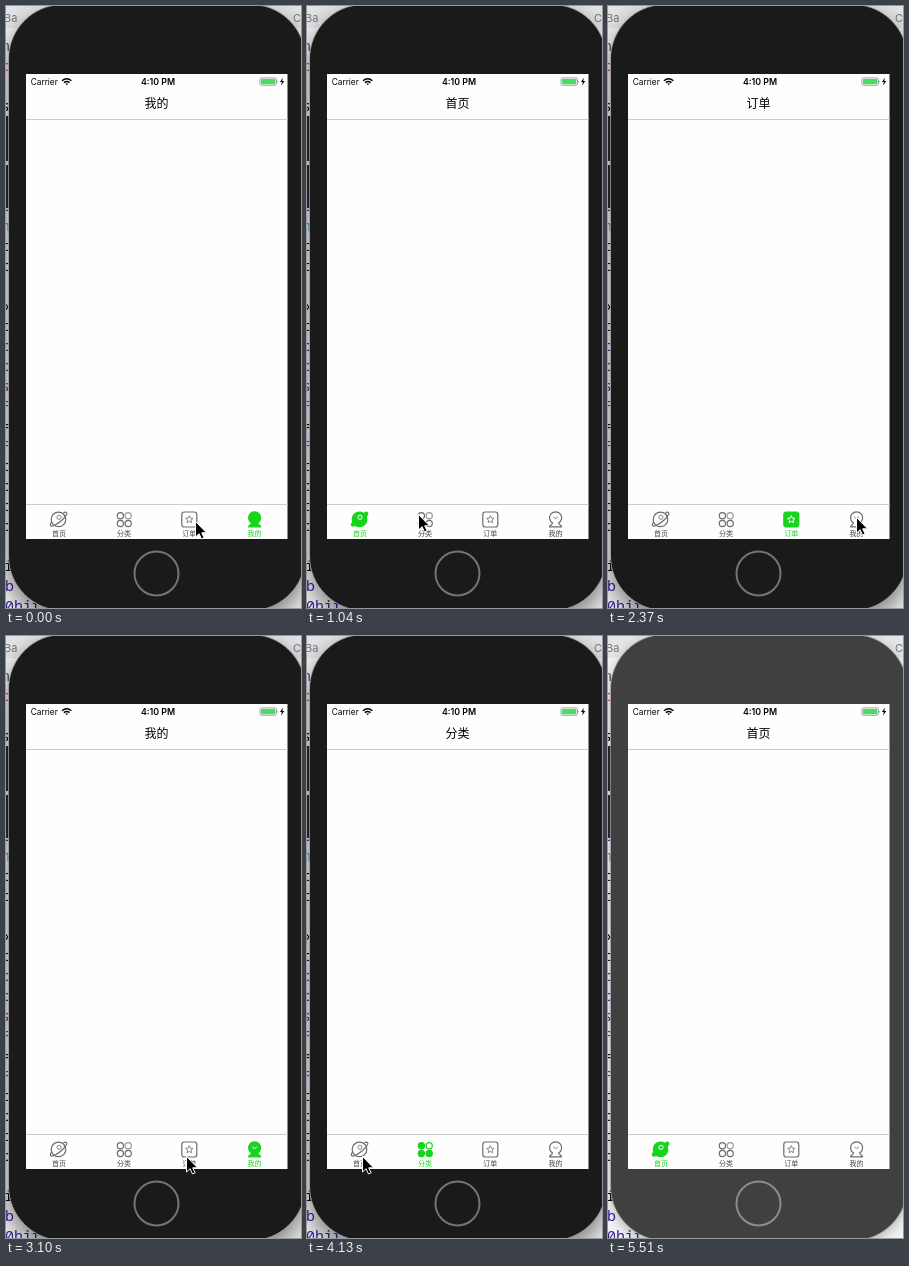
Animation of 295 by 602 pixels, one loop 5.61 s. Source, as an HTML page:

```html
<!DOCTYPE html>
<html lang="zh-CN">
<head>
<meta charset="utf-8">
<title>Tab bar</title>
<style>
  html, body { margin: 0; width: 100%; height: 100%; overflow: hidden; background: #f3f3f4; }
  svg { display: block; width: 295px; height: 602px; }
  svg * { animation: 5610ms step-end infinite; }

  text { font-family: Inter, "Noto Sans CJK SC", "Noto Sans CJK", sans-serif; }
  .title { font: 500 12px "Noto Sans CJK SC", "Noto Sans CJK", sans-serif; text-anchor: middle; }
  .label { font: 500 7px "Noto Sans CJK SC", "Noto Sans CJK", sans-serif; text-anchor: middle; fill: var(--label); }
  .code text { font: 15px "Noto Sans Mono", monospace; text-anchor: end; }

  .bar { --ink: #6c6c6c; --label: #444; --fill: none; --detail: #888; --pale: #999; }
  .on { --ink: #18d41c; --label: #18d41c; --fill: #18d41c; --detail: #fff; --pale: #18d41c; opacity: 0; }
  .solid { fill: var(--fill); stroke: var(--ink); stroke-width: 1.2; stroke-linejoin: round; }
  .pale { fill: none; stroke: var(--pale); stroke-width: 1.2; }
  .detail { fill: none; stroke: var(--detail); stroke-width: 1; stroke-linejoin: round; }

  .shell { fill: #999; animation-name: shell; }
  .body { fill: #1a1a1a; animation-name: body; }
  .button { fill: none; stroke: #747474; stroke-width: 2; animation-name: button; }
  .home { animation-name: home; }
  .sort { animation-name: sort; }
  .order { animation-name: order; }
  .me { animation-name: me; }
  .blank { opacity: 0; animation-name: blank; }
  .cursor { animation-name: cursor; }

  /* the window loses focus at the end: lighter body, weaker shadow */
  @keyframes shell {
    0% { filter: drop-shadow(0 10px 12px rgba(0, 0, 0, .5)) }
    98.21%, 100% { filter: drop-shadow(0 4px 6px rgba(0, 0, 0, .25)) }
  }
  @keyframes body { 0% { fill: #1a1a1a } 98.21%, 100% { fill: #404040 } }
  @keyframes button { 0% { stroke: #747474 } 98.21%, 100% { stroke: #8c8c8c } }
  @keyframes blank { 0% { opacity: 1 } 2.67%, 100% { opacity: 0 } }

  @keyframes home { 0%, 23.70% { opacity: 0 } 13.19%, 78.96%, 100% { opacity: 1 } }
  @keyframes sort { 0%, 34.40%, 78.96%, 100% { opacity: 0 } 23.70%, 68.44% { opacity: 1 } }
  @keyframes order { 0%, 47.41%, 68.44%, 100% { opacity: 0 } 34.40%, 57.93% { opacity: 1 } }
  @keyframes me { 0%, 47.41% { opacity: 1 } 13.19%, 57.93%, 100% { opacity: 0 } }

  @keyframes cursor {
    0% { transform: translate(189px, 515px) }
    2.67% { transform: translate(180px, 513px) }
    5.16% { transform: translate(110px, 507px) }
    7.84% { transform: translate(47px, 504px) }
    15.86% { transform: translate(50px, 505px) }
    18.53% { transform: translate(111px, 508px) }
    21.21% { transform: translate(117px, 507px) }
    26.38% { transform: translate(118px, 505px) }
    29.05% { transform: translate(184px, 523px) }
    31.72% { transform: translate(181px, 519px) }
    34.40% { transform: translate(181px, 517px) }
    37.07% { transform: translate(190px, 515px) }
    39.57% { transform: translate(240px, 512px) }
    42.24% { transform: translate(248px, 511px) }
    50.08% { transform: translate(245px, 510px) }
    52.76% { transform: translate(238px, 509px) }
    55.25% { transform: translate(180px, 520px) }
    57.93% { transform: translate(178px, 516px) }
    60.60% { transform: translate(176px, 513px) }
    63.27% { transform: translate(102px, 509px) }
    65.77% { transform: translate(112px, 507px) }
    71.12% { transform: translate(117px, 505px) }
    73.61% { transform: translate(55px, 520px) }
    76.29% { transform: translate(50px, 514px) }
    81.63% { transform: translate(49px, 510px) }
    84.13% { transform: translate(51px, 508px) }
    86.80% { transform: translate(211px, 600px) }
    89.48%, 100% { transform: translate(320px, 640px) }
  }
</style>
</head>
<body>
<svg viewBox="0 0 295 602">
  <defs>
    <g id="home">
      <circle class="solid" cx="52.5" cy="513.4" r="7.3"/>
      <path class="solid" d="M45.6 516C43.2 519 44.5 521 48 519.5C53 517.5 59 512 60.6 508.5C61.5 506 59.5 505.5 57.4 506.8"/>
      <circle class="detail" cx="53" cy="511.3" r="2.1"/>
      <text class="label" x="53" y="530.2">首页</text>
    </g>
    <g id="sort">
      <circle class="solid" cx="114.4" cy="509.7" r="3.1"/>
      <circle class="pale" cx="122.2" cy="509.7" r="3.1"/>
      <circle class="solid" cx="114.4" cy="517.5" r="3.1"/>
      <circle class="solid" cx="122.2" cy="517.5" r="3.1"/>
      <text class="label" x="118" y="530.2">分类</text>
    </g>
    <g id="order">
      <rect class="solid" x="175.8" y="506" width="15" height="15" rx="2.5"/>
      <path class="detail" d="M183.3 509.6L184.4 512.1 187 512.4 185 514.1 185.6 516.7 183.3 515.4 181 516.7 181.6 514.1 179.6 512.4 182.2 512.1Z"/>
      <text class="label" x="183.3" y="530.2">订单</text>
    </g>
    <g id="me">
      <path class="solid" d="M245.6 517A6 6 0 1 1 251.6 517C251.8 518.6 254.4 518.8 254.6 520.8H242.6C242.8 518.8 245.4 518.6 245.6 517Z"/>
      <path class="detail" d="M246.3 510.9L248.6 512.6 250.9 510.9"/>
      <text class="label" x="248.5" y="530.2">我的</text>
    </g>
  </defs>

  <!-- editor behind the phone -->
  <rect width="295" height="602" fill="#f3f3f4"/>
  <rect width="295" height="22" fill="#e5e5e7"/>
  <text x="-2" y="16" font-size="11" fill="#777">Ba</text>
  <text x="287" y="16" font-size="11" fill="#777">C</text>
  <rect y="110" width="4" height="92" fill="#2b2b2b"/>
  <rect y="155" width="2" height="4" fill="#eee"/>
  <g class="code">
    <text x="4" y="45" fill="#456">n</text>
    <text x="4" y="65" fill="#c0432f">c</text>
    <text x="4" y="105">s</text>
    <text x="4" y="205" fill="#2a22a8">c</text>
    <text x="4" y="225" fill="#2a8fa8">n</text>
    <text x="4" y="245">t</text>
    <text x="4" y="265">t</text>
    <text x="4" y="305">»</text>
    <text x="4" y="325">t</text>
    <text x="4" y="345" fill="#2a22a8">c</text>
    <text x="4" y="365" fill="#2a22a8">c</text>
    <text x="4" y="385" fill="#4a2aa0">s</text>
    <text x="4" y="405" fill="#2a4fb8">F</text>
    <text x="4" y="425">=</text>
    <text x="4" y="445" fill="#2a4fb8">F</text>
    <text x="4" y="465">t</text>
    <text x="4" y="485">c</text>
    <text x="4" y="505">t</text>
    <text x="4" y="525">c</text>
    <text x="7" y="565" font-weight="700">i</text>
    <text x="8" y="585" fill="#35209c">b</text>
    <text x="35" y="605" fill="#35209c">0hit</text>
  </g>

  <!-- phone -->
  <rect class="shell" x="2.2" y="-1.8" width="297.6" height="606.6" rx="54.8"/>
  <rect class="body" x="3" y="-1" width="296" height="605" rx="54"/>
  <circle class="button" cx="150.5" cy="567.5" r="22"/>
  <rect x="20" y="68" width="261.5" height="465" fill="#fefefe"/>

  <text x="24.7" y="78.7" font-size="8.3">Carrier</text>
  <g fill="none" stroke="#000" stroke-width="1.5">
    <path d="M56 74.8Q60.7 70.8 65.4 74.8M57.9 76.7Q60.7 74.4 63.5 76.7"/>
    <path d="M59.3 77.6H62.1L60.7 79.2Z" fill="#000" stroke="none"/>
  </g>
  <text x="152" y="78.7" font-size="8.8" font-weight="600" text-anchor="middle">4:10 PM</text>
  <rect x="253.9" y="71.9" width="16.6" height="7.4" rx="1.8" fill="#fff" stroke="#8a8a8a" stroke-width=".8"/>
  <rect x="255" y="73" width="14.4" height="5.2" rx=".9" fill="#4cd964"/>
  <path d="M271.4 74.4Q272.8 75.6 271.4 76.8Z" fill="#8a8a8a"/>
  <path d="M276.8 71.8L274 76.1H275.8L275.2 79.4 278.2 74.9H276.3Z"/>
  <path d="M20 113.5H281.5M20 498.5H281.5" stroke="#ccc"/>

  <g class="bar">
    <use href="#home"/>
    <use href="#sort"/>
    <use href="#order"/>
    <use href="#me"/>
    <g class="on home">
      <rect x="40" y="502" width="26" height="30" fill="#fefefe"/>
      <use href="#home"/>
      <text class="title" x="150.5" y="102.3">首页</text>
    </g>
    <g class="on sort">
      <rect x="105" y="502" width="26" height="30" fill="#fefefe"/>
      <use href="#sort"/>
      <text class="title" x="150.5" y="102.3">分类</text>
    </g>
    <g class="on order">
      <rect x="170" y="502" width="26" height="30" fill="#fefefe"/>
      <use href="#order"/>
      <text class="title" x="150.5" y="102.3">订单</text>
    </g>
    <g class="on me">
      <rect x="235" y="502" width="26" height="30" fill="#fefefe"/>
      <use href="#me"/>
      <rect class="blank" x="245" y="509" width="7" height="5" fill="#18d41c"/>
      <text class="title" x="150.5" y="102.3">我的</text>
    </g>
  </g>

  <path class="cursor" d="M.5 .5V16L4.1 12.7 6.5 17.9 9.1 16.8 6.7 11.8H11.5Z" stroke="#fff" stroke-linejoin="round"/>
</svg>
</body>
</html>
```
